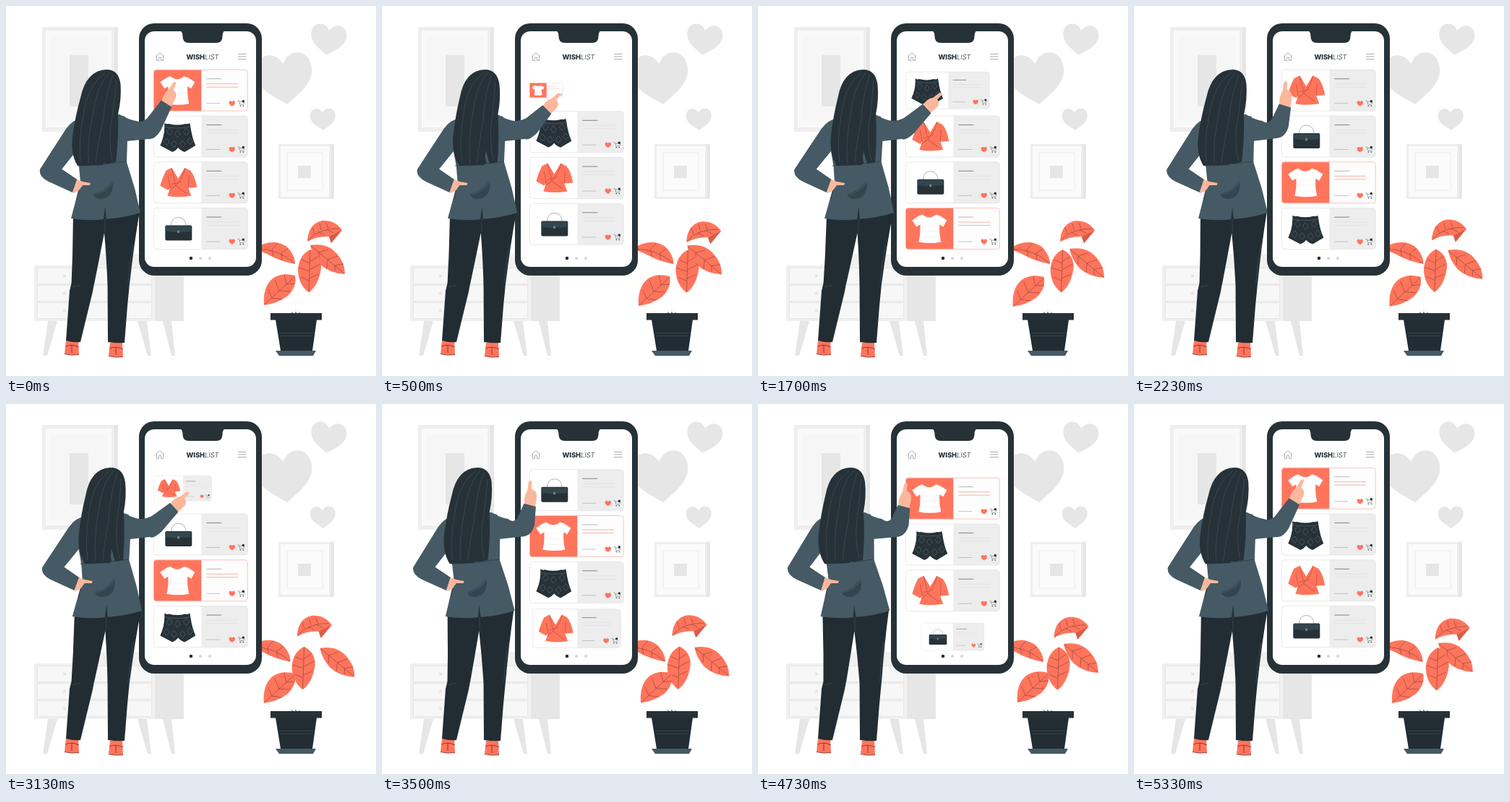
Write an HTML page that moves like this. It is 512x512 px and loops after 5370 ms.

```html
<!DOCTYPE html>
<html lang="en">
<head>
<meta charset="utf-8">
<title>Wishlist</title>
<style>
  html, body { margin: 0; height: 100%; overflow: hidden; background: #fff; }
  svg { display: block; width: 100vw; height: 100vh; }
  text { font: 300 9.3px Inter, sans-serif; fill: #263238; }
  .vein { fill: none; stroke: #94473f; stroke-width: .7; }
  .strand { fill: none; stroke: #46555d; stroke-width: .6; }
</style>
</head>
<body>
<svg id="stage" viewBox="0 0 512 512"></svg>
<script>
const LOOP = 5370, SWIPE = LOOP / 4, PITCH = 63.8;
const DARK = '#263238', BLUE = '#455a64', ORANGE = '#ff755c', RUST = '#d95c4a', SKIN = '#fbb79c', BLACK = '#222d33';
const LIGHT = '#f3f3f3', GREY = '#e6e6e6';

const rect = (x, y, w, h, fill, extra = '') => `<rect x="${x}" y="${y}" width="${w}" height="${h}" fill="${fill}" ${extra}/>`;
const path = (d, fill, extra = '') => `<path d="${d}" fill="${fill}" ${extra}/>`;
const line = (d, stroke, width = 1, extra = '') => path(d, 'none', `stroke="${stroke}" stroke-width="${width}" ${extra}`);
const dot = (x, y, r, fill) => `<circle cx="${x}" cy="${y}" r="${r}" fill="${fill}"/>`;
const group = (id, body) => `<g id="${id}">${body}</g>`;
const heart = (x, y, w, h, turn, fill) =>
  path('M0 .5C-.18 .34-.5 .16-.5-.17C-.5-.58-.1-.6 0-.3C.1-.6 .5-.58 .5-.17C.5 .16 .18 .34 0 .5Z', fill,
    `transform="translate(${x} ${y}) rotate(${turn}) scale(${w} ${h})"`);

const room = () =>
  rect(50, 29, 105, 145, '#eeeeee') + rect(150, 29, 5, 145, GREY) +
  rect(55, 34, 91, 134, '#f9f9f9') + rect(62, 42, 77, 118, '#f6f6f6') + rect(88, 68, 26, 71, GREY) +
  rect(377, 191, 77, 76, '#eeeeee') + rect(449, 191, 5, 76, GREY) +
  rect(380, 194, 67, 70, '#fafafa') + rect(388, 202, 51, 54, LIGHT) + rect(390, 204, 47, 50, '#fbfbfb') + rect(404, 221, 18, 17, GREY) +
  heart(385.5, 101.5, 78, 70, -6, GREY) + heart(446, 47, 49, 42, 6, GREY) + heart(438.5, 157, 35, 30, -3, GREY) +
  rect(110, 343, 74, 16, '#f0f0f0') +
  path('M58 436H71L57 484H51ZM182 436H195L201 484H196ZM217 436H229L234 484H229Z', GREY) +
  rect(39, 359, 167, 77, '#f0f0f0') + rect(206, 359, 40, 77, GREY) +
  [362.5, 386.5, 410.5].map(y => rect(43.5, y, 158, 22, '#f7f7f7', 'stroke="#e6e6e6"') + dot(81, y + 11, 2.2, GREY)).join('');

const leaves = [
  { amp: 10.5, lift: .3, peak: 900, art:
    path('M417 326Q418 301 438 297Q455 296 465 310L450 328L447 319Q431 318 417 326Z', ORANGE) +
    path('M447 319L465 310L450 328Z', RUST) +
    '<path class="vein" d="M418 324Q434 307 461 308M427 315L424 306M436 310L434 301M446 308L443 300M432 312L441 317M443 309L453 314"/>' },
  { amp: 7.2, lift: .5, peak: 2685, art:
    path('M421 331Q445 327 458 343Q469 355 469 371Q448 370 435 358Q424 346 421 331Z', ORANGE) +
    '<path class="vein" d="M422 332L468 370M433 341L446 337M445 351L459 346M455 359L467 357M433 341V352M445 351L444 363M455 359V367"/>' },
  { amp: 6.2, lift: .15, peak: 900, art:
    path('M421 337Q437 345 436 363Q433 386 419 396.500Q404 385 404 364Q406 344 421 337Z', ORANGE) +
    '<path class="vein" d="M421 338L419 395M420 354L431 347M420 365L435 357M419 377L432 371M420 356L409 351M420 367L405 362M419 380L408 375"/>' },
  { amp: 7, lift: .02, peak: 1150, art:
    path('M344 336Q357 326 373 327Q388 329 395 341Q400 349 400 357Q378 353 361 343Z', ORANGE) +
    '<path class="vein" d="M345 336Q378 336 399 356M368 337L376 328M381 342L390 336M368 337L370 346M381 342L382 351"/>' },
  { amp: 3.3, lift: -.5, peak: 4280, art:
    path('M357 414Q355 389 369 377Q382 368 400 373Q403 388 390 401Q375 412 357 414Z', ORANGE) +
    '<path class="vein" d="M358 413L399 375M368 404L363 392M378 394L372 379M388 385L385 372M368 404L382 406M378 394L394 395M388 385L400 384"/>' }
];

const pot = () =>
  line('M396 426V423.500M401 426V423M406 426V424', DARK, 1) +
  path('M373 434H430L424 477H380Z', BLACK) + rect(366, 425, 71, 9.5, DARK) +
  line('M378 452.500H426M379 456.500H425', '#3f4d54', .7) +
  path('M373 477H429L425 484H378Z', BLUE);

const phone = () =>
  rect(184, 24, 170, 349, DARK, 'rx="21"') +
  rect(192, 35, 154, 326, '#fff', 'rx="13"') +
  path('M241 34H303Q299.500 36 299.500 42Q299.500 51 291 51H253Q244.500 51 244.500 42Q244.500 36 241 34Z', DARK) +
  line('M207 70L213 64.500L219 70M208.500 69V75.500H211.500V71H214.500V75.500H217.500V69', '#899195', .7) +
  line('M321 66.500H332.500M321 70H332.500M321 73.500H332.500', '#8d9599', .8) +
  '<text x="272" y="74" text-anchor="middle"><tspan font-weight="800">WISH</tspan><tspan font-style="italic">LIST</tspan></text>' +
  dot(256, 349, 2.3, DARK) + dot(269, 349, 2.1, '#d5d5d5') + dot(282, 349, 2.1, '#d5d5d5');

const diamond = (x, y) => `M${x} ${y - 5}l4 5l-4 5l-4-5Z`;
const goods = {
  tee: path('M23 9Q33 17 42 9L48 11L57 17L52 26L47 23Q46 35 49 47Q34 50 18 47Q21 35 20 23L15 26L9 17L18 11Z', '#fff') +
    line('M23 10Q33 18 42 10M21 24Q33 27 46 24M21 32H46M20 40H47', '#eeeae9', .6),
  shorts: path('M15 10Q18 12 21 11Q33 14 44 11Q47 12 50 10L51 15Q53 30 58 41L43 50Q37 48 34 44Q31 48 26 50L9 41Q15 28 15 15Z', DARK) +
    line([[22, 22], [33, 25], [45, 22], [18, 36], [28, 39], [40, 39], [50, 35]].map(p => diamond(...p)).join('') + 'M15 15Q33 19 51 15', '#5f6d75', .6),
  wrap: path('M25 8L17 12Q12 22 9 33L20 39L23 36L19 47Q35 50 52 47L48 36L60 35Q57 19 51 12L43 8L34 23Z', ORANGE) +
    line('M25 9L31 33M43 9Q40 27 22 39M20 20L23 36M49 19L48 35M31 33L46 44M24 31L38 27', RUST, 1.2),
  bag: line('M24 25Q25 13 34 13Q44 13 45 25', '#a3abaf', .9) + rect(16, 24, 37, 21, DARK, 'rx="2"') +
    path('M16.500 25H52V32Q34 35 16.500 32Z', '#34454d') + rect(33, 31, 2.5, 3.5, '#7d898f')
};

const card = name => {
  const hot = name === 'tee', edge = hot ? '#f5c0b5' : '#e6e6e6';
  return rect(0, 0, 130, 57, '#fff', 'rx="4"') +
    path('M66 0H126Q130 0 130 4V53Q130 57 126 57H66Z', hot ? '#fdfdfd' : '#ededed') +
    path('M4 0H66V57H4Q0 57 0 53V4Q0 0 4 0Z', hot ? ORANGE : '#fff') +
    rect(0, 0, 130, 57, 'none', `rx="4" stroke="${edge}" stroke-width=".9"`) +
    goods[name] +
    line('M73 12.500H94', hot ? '#b5b5b5' : '#7d8589', 1) +
    line('M73 19.500H117M73 24H117', hot ? '#f6ab9f' : '#e2e2e2', .9) +
    line('M73 46.500H92', '#b0b5b8', .8) +
    heart(108.5, 46.8, 8.5, 7.5, 0, ORANGE) +
    line('M116 43H118L119.500 48H124.500L125.500 44.500H118.500', '#7b8489', .7) +
    dot(120, 50, .8, DARK) + dot(124, 50, .8, DARK) + dot(124, 43.5, 1.7, DARK);
};

const shoe = (x, y) =>
  path(`M${x + 2} ${y}H${x + 19}L${x + 20} ${y + 19}Q${x + 10} ${y + 21} ${x} ${y + 18}Z`, ORANGE) +
  line(`M${x} ${y + 18.5}Q${x + 10} ${y + 21} ${x + 20} ${y + 19.5}M${x + 1} ${y + 8}Q${x + 10} ${y + 4} ${x + 20} ${y + 9}M${x + 10} ${y + 6}V${y + 17}`, '#8b3c34', 1);

const shins = () => shoe(81, 463) + shoe(142, 466) +
  path('M90.500 384L88 394L83 463Q93 466 103 465L120 395L122 384ZM140.500 384L141 465Q153 467 164 466L168 415L171 384Z', BLACK) +
  line('M92 389L103 386', '#46545b', .7);

const thighs = () =>
  path('M93 286L92 345L90.500 385H122Q129 350 136 314Q139 348 140.500 385H171Q177 330 185 284Z', BLACK) +
  line('M137 294V313M176 330Q170 358 169 385', '#46545b', .6);

const torso = () =>
  path('M108 154Q92 157 83 170Q63 201 47 226Q45 236 59 243L92 258L99 241L77 226L97 201L101 222L103 244L90 294Q115 298 137 295Q165 293 186 286L178 252L167 216L168 186L165 153Q135 144 108 154Z', BLUE) +
  path('M136 194L143 218H132ZM137 278L139 295H135Z', DARK) +
  path('M121 262Q138 258 148 244Q149 267 129 267Q123 266 121 262Z', '#34454d') +
  line('M99 221Q130 221 166 215M77 226L99 241M121 261Q138 256 147 242M103 244L98 268', '#2f3f47', .8) +
  path('M92 258L98 240L106 243L117 245L116 248L106 248L101 255L94 259Z', SKIN);

const hair = () =>
  path('M139 88Q156 88 158.500 108Q160 128 155 150Q156 183 152 216L141 218L136.500 200L134 220L99 221Q89 205 92 180Q96 152 103 127Q111 89 139 88Z', DARK) +
  '<path class="strand" d="M137 93Q113 109 107 152Q100 185 103 216M143 92Q125 112 120 150Q112 190 114 217M148 95Q137 125 134 160Q128 185 124 217M153 104Q149 145 145 165Q142 190 147 214"/>';

const stage = document.getElementById('stage');
const names = Object.keys(goods);
stage.innerHTML = room() +
  [1, 0, 2, 3, 4].map(i => group('leaf' + i, leaves[i].art)).join('') + pot() + phone() +
  names.map(n => group(n, card(n))).join('') +
  shins() + group('body', thighs() + torso()) +
  `<path id="hand" fill="${SKIN}"/><path id="sleeve" fill="${BLUE}"/>` + group('hair', hair());
const el = id => document.getElementById(id);
const move = (id, value) => el(id).setAttribute('transform', value);

// phase, body sway, hair tip sway, elbow x y, wrist x y, fingertip x y
const poses = [
  [0, 0, 0, 199, 172, 222, 135, 234, 105],
  [440, 6, 10, 201, 172, 233, 143, 253, 122],
  [703, -11, -7, 194, 172, 202, 142, 205, 109],
  [888, -3, -3, 199, 171, 209, 138, 210, 104],
  [930, -2, -2, 200, 171, 211, 135, 216, 101],
  [1180, 0, 0, 199, 172, 222, 135, 234, 105]
];

function poseAt(phase) {
  const n = poses.length;
  const key = k => {
    const turn = Math.floor(k / n), p = poses[k - turn * n];
    return [p[0] + turn * SWIPE, ...p.slice(1)];
  };
  const i = poses.findLastIndex(p => p[0] <= phase);
  const [a, b, c, d] = [key(i - 1), key(i), key(i + 1), key(i + 2)];
  const span = c[0] - b[0], u = (phase - b[0]) / span;
  return b.slice(1).map((v, j) => {
    const k = j + 1;
    const m0 = (c[k] - a[k]) / (c[0] - a[0]) * span, m1 = (d[k] - b[k]) / (d[0] - b[0]) * span;
    const gap = c[k] - v;
    return v + u * (m0 + u * (3 * gap - 2 * m0 - m1 + u * (m0 + m1 - 2 * gap)));
  });
}

function drawWoman(phase) {
  const [sway, tipSway, ex, ey, wx, wy, tx, ty] = poseAt(phase);
  const k = sway / 295, h = (tipSway - sway) / 125;
  move('body', `matrix(1 0 ${-k} 1 ${k * 385} 0)`);
  move('hair', `matrix(1 0 ${h} 1 ${sway - 90 * h} 0)`);

  // Point at a distance along and to the left of the line from one joint to the next.
  const along = (x, y, toX, toY) => {
    const len = Math.hypot(toX - x, toY - y), dx = (toX - x) / len, dy = (toY - y) / len;
    return (f, s) => `${x + dx * f + dy * s} ${y + dy * f - dx * s} `;
  };
  const arm = along(ex, ey, wx, wy), reach = Math.hypot(wx - ex, wy - ey);
  const sx = 157 + sway * .8;
  el('sleeve').setAttribute('d', `M${sx - 12} 150L${sx} 150Q${sx + 14} 158 ${sx + 23} 159Q${arm(2, 15)}${arm(12, 12)}L${arm(reach, 8.5)}L${arm(reach, -8.5)}L${arm(8, -13)}Q${arm(-8, -13)}${ex - 2} ${ey + 12}L${sx + 10} 187L${sx - 12} 190Z`);

  const size = Math.hypot(tx - wx, ty - wy) / 31, palm = along(wx, wy, tx, ty);
  const at = (f, s) => palm(f * size, s);
  el('hand').setAttribute('d', `M${at(-4, 6)}L${at(4, 8)}Q${at(13, 8)}${at(18, 4)}L${at(29, 2.5)}Q${at(32.5, 0)}${at(30, -2)}L${at(20, -2)}Q${at(19, -8)}${at(13, -9)}Q${at(6, -9)}${at(-4, -7)}Z`);
}

const clamp = v => Math.min(1, Math.max(0, v));
const easeOut = v => 1 - (1 - clamp(v)) ** 2;

function drawCards(turn, phase) {
  const slide = easeOut((phase - 480) / 420);
  names.forEach((name, i) => {
    let slot = (i - turn + 4) % 4, scale = 1, origin = 65;
    if (slot === 0 && phase < 560) {
      scale = 1 - clamp((phase - 260) / 300) ** 2;
      origin = 0;
    } else {
      if (slot === 0) {
        slot = 4;
        scale = easeOut((phase - 560) / 340);
      }
      slot -= slide;
    }
    move(name, `translate(${204.3 + origin} ${116.7 + slot * PITCH}) scale(${scale}) translate(${-origin} -28.5)`);
  });
}

function drawPlant(t) {
  leaves.forEach(({ amp, lift, peak }, i) => {
    const wave = time => amp * Math.cos((time - peak) / LOOP * 2 * Math.PI);
    const dx = wave(t) - wave(0);
    move('leaf' + i, `translate(${dx} ${dx * lift})`);
  });
}

function frame() {
  const t = performance.now() % LOOP, turn = Math.floor(t / SWIPE), phase = t - turn * SWIPE;
  drawWoman(phase);
  drawCards(turn, phase);
  drawPlant(t);
  requestAnimationFrame(frame);
}
frame();
</script>
</body>
</html>
```
